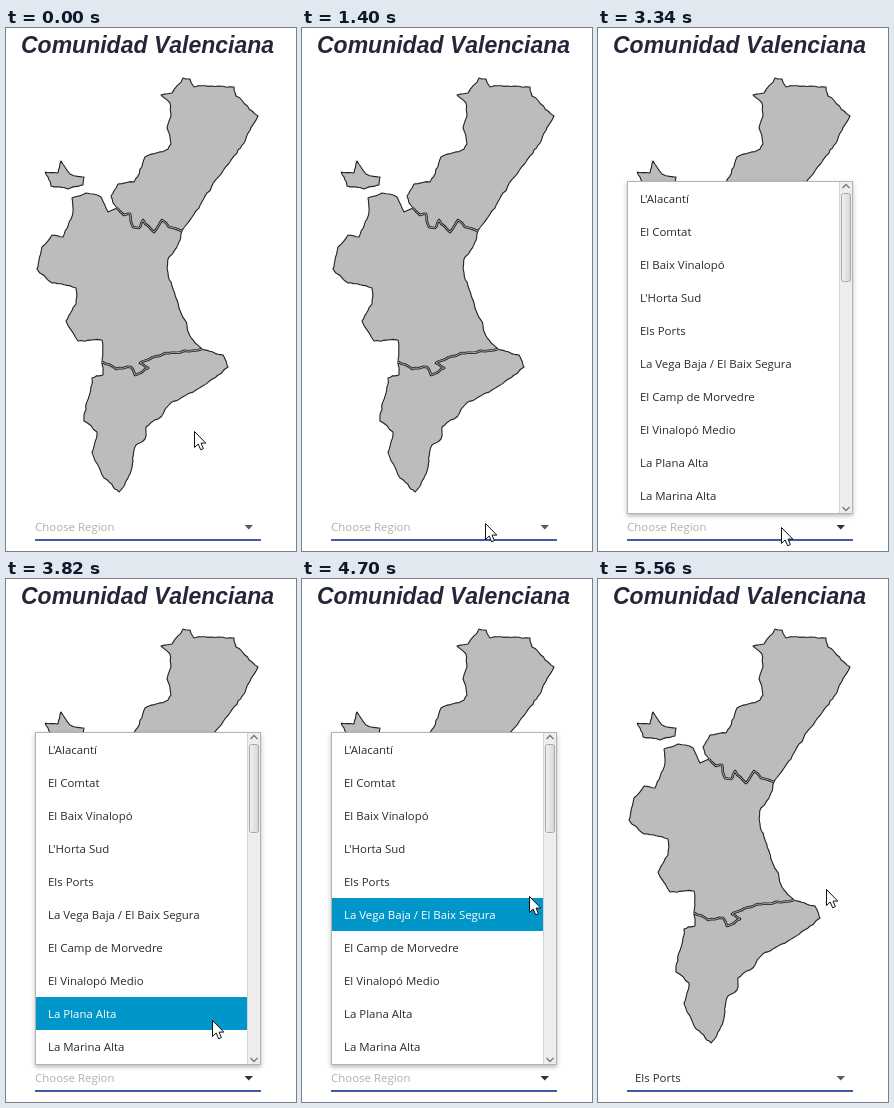
Recreate the animation shown at these times as an HTML page. Size 290 px wide and 523 px high, loop 6.58 s.

```html
<!DOCTYPE html>
<html lang="es">
<head>
<meta charset="utf-8">
<title>Region map</title>
<style>
html, body { margin: 0; width: 100%; height: 100%; overflow: hidden; background: #fff; }
svg { display: block; width: 100%; height: 100%; }
text { font: 11.45px "Open Sans", "Noto Sans", sans-serif; fill: #2b2b2b; }
.title { font: italic bold 23px "Liberation Sans", Arial, sans-serif; font-kerning: none; fill: #26263a; }
.prompt { fill: #a9b4a8; }
.land { fill: #bcbcbc; stroke: #222; stroke-width: 1.1; stroke-linejoin: round; }
.border { fill: none; stroke: #222; stroke-width: 2.6; stroke-linejoin: round; }
.seam { fill: none; stroke: #b4b4b4; stroke-width: .9; stroke-linejoin: round; }
.chevron { fill: none; stroke: #777; stroke-width: 1.3; }
#popup { filter: drop-shadow(0 2px 2px rgba(0, 0, 0, .28)); }
</style>
</head>
<body>
<svg viewBox="0 0 290 523">
  <defs>
    <linearGradient id="thumb">
      <stop offset="0" stop-color="#f2f2f2"/>
      <stop offset="1" stop-color="#d6d6d6"/>
    </linearGradient>
  </defs>
  <text class="title" x="15" y="25">Comunidad Valenciana</text>
  <g id="map"></g>

  <text id="prompt" class="prompt" x="29" y="503">Choose Region</text>
  <text id="choice" x="37" y="503">Els Ports</text>
  <path id="arrow" d="M238.5 497h8.5l-4.25 4.5z"/>
  <rect x="29" y="511" width="226" height="2" fill="#4059a9"/>

  <g id="popup">
    <rect x="29.5" y="153.5" width="225" height="332" fill="#fff" stroke="#b4b4b4"/>
    <rect x="241" y="154" width="13" height="331" fill="#eee"/>
    <path d="M241.5 154v331" stroke="#d4d4d4"/>
    <rect x="243.5" y="165.5" width="9" height="88" rx="2" fill="url(#thumb)" stroke="#a9a9a9"/>
    <path class="chevron" d="M244.5 160l3.5-3.5 3.5 3.5M244.5 479l3.5 3.5 3.5-3.5"/>
    <rect id="hover" x="30" width="211" height="33"/>
    <g id="items"></g>
  </g>

  <path id="cursor" d="M.5 .5V16.5L4.2 13L6.7 18.8L9.4 17.6L7 12.1H11.8Z"
        fill="#fff" stroke="#111" stroke-linejoin="round"/>
</svg>
<script>
const $ = id => document.getElementById(id);
const make = (tag, parent, attrs) => {
  const el = document.createElementNS(parent.namespaceURI, tag);
  for (const k in attrs) el.setAttribute(k, attrs[k]);
  return parent.appendChild(el);
};

let seed = 7;
const jitter = () => (seed = seed * 16807 % 2147483647) / 2147483647 - .5;

// Splits an edge in half, nudging each midpoint, until the pieces are short
function split(a, b) {
  const size = Math.hypot(b[0] - a[0], b[1] - a[1]);
  if (size < 5) return [a];
  const amp = Math.min(2, size * .2);
  const mid = [0, 1].map(n => (a[n] + b[n]) / 2 + jitter() * amp);
  return [...split(a, mid), ...split(mid, b)];
}
function rough(corners) {
  const pts = corners.split(' ').map(p => p.split(',').map(Number));
  const line = pts.slice(1).flatMap((p, i) => split(pts[i], p));
  return 'M' + [...line, pts[pts.length - 1]].map(p => p.map(v => v.toFixed(1))).join('L');
}
const draw = (cls, d) => make('path', $('map'), { class: cls, d });

// Main corners only; the coast detail is seeded
const W1 = '111,180', E1 = '176,203', E2 = '196,321', W2 = '96,334';
const north = '105,168 112,156 128,154 139,129 162,121 165,116 161,100 165,88 164,75 155,67 ' +
  '166,65 177,50 184,51 188,59 212,58 228,59 230,68 252,88 238,115 201,165';
const east = '173,214 163,229 162,245 171,272 184,308';
const south = '217,327 222,339 190,362 162,378 152,391 140,399 139,411 130,417 125,443 ' +
  '113,464 98,450 86,424 91,404 78,393 86,350 97,347';
const west = '96,312 72,313 60,293 70,276 70,260 46,255 31,241 36,219 46,207 57,209 ' +
  '67,184 66,170 80,165 95,169 102,184';
draw('land', rough([W1, north, E1, east, E2, south, W2, west, W1].join(' ')));
draw('land', rough('39,144 52,145 55,133 64,146 78,149 77,157 62,161 45,158 39,144'));

const borders = [
  [W1, '118,187 124,186 127,199 133,200 137,192 148,204 156,192 163,199', E1],
  [W2, '110,341 125,339 129,347 142,340 134,335 160,325', E2]
];
for (const d of borders.map(b => rough(b.join(' ')))) {
  draw('border', d);
  draw('seam', d);
}

const TOP = 154, ROW = 33;
const items = ["L'Alacantí", 'El Comtat', 'El Baix Vinalopó', "L'Horta Sud", 'Els Ports',
  'La Vega Baja / El Baix Segura', 'El Camp de Morvedre', 'El Vinalopó Medio',
  'La Plana Alta', 'La Marina Alta'].map((name, i) => {
    const el = make('text', $('items'), { x: 42, y: TOP + ROW * i + 21 });
    el.textContent = name;
    return el;
  });

// Pointer path: [ms, x, y], sampled every STEP ms
const LOOP = 6580, STEP = 80, PHASE = 60;
const OPEN = 2250, PICK = 5320, CLOSE = 5560;
const path = [
  [-20, 188, 403], [620, 188, 403], [700, 188, 405], [780, 188, 405], [1140, 189, 455],
  [1380, 182, 503], [3260, 182, 503], [3340, 183, 499], [3980, 213, 422], [4220, 221, 383],
  [4700, 227, 317], [4860, 228, 310], [LOOP, 228, 310]
];

function pointer(t) {
  const s = Math.floor((t - PHASE) / STEP) * STEP + PHASE;
  const i = path.findIndex(k => k[0] > s);
  const a = path[i - 1], b = path[i];
  const f = (s - a[0]) / (b[0] - a[0]);
  return [1, 2].map(n => Math.round(a[n] + (b[n] - a[n]) * f));
}

const show = (id, on) => $(id).style.display = on ? '' : 'none';

function render(t) {
  const [x, y] = pointer(t);
  const open = t >= OPEN && t < CLOSE;
  const picked = t >= PICK;
  const row = Math.floor((y + 2.5 - TOP) / ROW);

  $('cursor').setAttribute('transform', `translate(${x} ${y})`);
  show('popup', open);
  show('hover', row < items.length);
  $('hover').setAttribute('y', TOP + ROW * row);
  $('hover').setAttribute('fill', picked ? '#0088c4' : '#0096c9');
  items.forEach((el, i) => el.style.fill = i === row ? '#fff' : '');
  $('arrow').setAttribute('fill', open ? '#333' : '#5c5c5c');
  show('prompt', !picked);
  show('choice', picked);
}

const begin = performance.now();
function tick() {
  render((performance.now() - begin) % LOOP);
  requestAnimationFrame(tick);
}
render(0);
requestAnimationFrame(tick);
</script>
</body>
</html>
```
